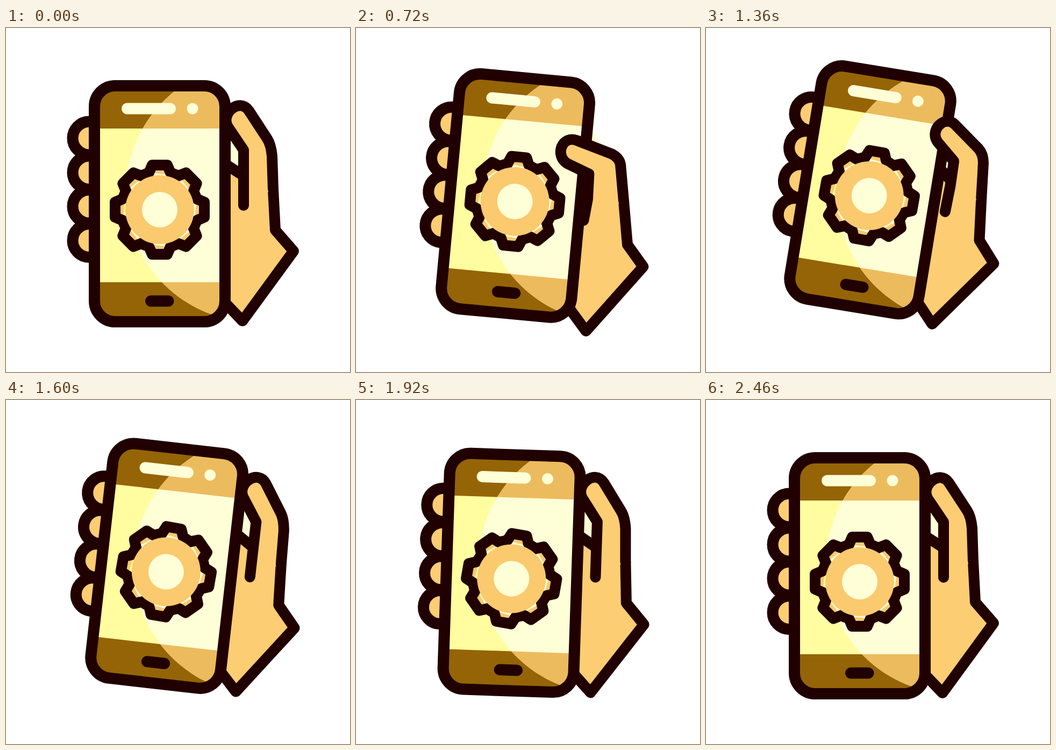
These frames come from a looping animation (640 px wide and 640 px high, 2620 ms). An HTML page without scripts:

```html
<!DOCTYPE html>
<html lang="en">
<head>
<meta charset="utf-8">
<title>Phone in hand</title>
<style>
  html, body { margin: 0; width: 100%; height: 100%; overflow: hidden; background: #fff; }
  svg { display: block; width: 100%; height: 100%; }
  .line { stroke: #200000; stroke-width: 21; stroke-linecap: round; stroke-linejoin: round; }
  .thin { stroke-width: 20; }
  .skin { fill: #fccd73; }
  .pale { fill: #feffd6; }
</style>
</head>
<body>
<svg viewBox="0 0 640 640">
  <defs>
    <clipPath id="body"><rect x="165" y="108" width="242" height="438" rx="38"/></clipPath>
    <clipPath id="glare"><circle cx="464" cy="306" r="241"/></clipPath>
    <path id="tooth" d="M-20 -69L-14 -83H14L20 -69L34.65 -62.9"/>
    <path id="bands" d="M165 108H407V187H165ZM165 473H407V546H165Z"/>
  </defs>

  <g>
    <!-- whole hand and phone tilt around the wrist -->
    <animateTransform attributeName="transform" type="rotate" dur="2.62s" repeatCount="indefinite"
      calcMode="spline" keyTimes="0;.0763;.458;.8397;1"
      values="0 455 434;0 455 434;10 455 434;0 455 434;0 455 434"
      keySplines="0 0 1 1;.333 0 .667 1;.333 0 .667 1;0 0 1 1"/>

    <!-- fingers -->
    <g class="line skin">
      <circle cx="155" cy="205" r="31"/>
      <circle cx="155" cy="269" r="31"/>
      <circle cx="155" cy="332" r="31"/>
      <circle cx="155" cy="395.500" r="31"/>
    </g>

    <!-- palm, with the pale gap under the thumb -->
    <path class="pale" d="M410 182L442 227V275L400 248Z"/>
    <path class="line thin skin" d="M442 275L400 248L395 498L440 545L535 415L501 376L497 300">
      <animate attributeName="d" dur="2.62s" repeatCount="indefinite"
        calcMode="spline" keyTimes="0;.0763;.458;.5725;1"
        values="M442 275L400 248L395 498L440 545L535 415L501 376L497 300;
                M442 275L400 248L395 498L440 545L535 415L501 376L497 300;
                M418 300L395 272L395 516L440 567L535 438L502 400L487 320;
                M442 275L400 248L395 498L440 545L535 415L501 376L497 300;
                M442 275L400 248L395 498L440 545L535 415L501 376L497 300"
        keySplines="0 0 1 1;.25 1 .5 1;.333 0 .667 1;0 0 1 1"/>
    </path>

    <!-- phone -->
    <g clip-path="url(#body)">
      <rect x="165" y="108" width="242" height="438" fill="#fffd9f"/>
      <use href="#bands" fill="#956406"/>
      <g clip-path="url(#glare)">
        <rect class="pale" x="165" y="108" width="242" height="438"/>
        <use href="#bands" fill="#ecbb5e"/>
      </g>
    </g>
    <rect class="line" x="164.500" y="107.500" width="243" height="439" rx="38.500" fill="none"/>
    <rect class="pale" x="215" y="139.500" width="101" height="21" rx="10.500"/>
    <circle class="pale" cx="347" cy="150" r="10.500"/>
    <path class="line" d="M269.500 508H302"/>

    <!-- gear -->
    <g transform="translate(286 338)">
      <g>
        <animateTransform attributeName="transform" type="rotate" dur="2.62s" repeatCount="indefinite"
          calcMode="spline" keyTimes="0;.458;.8397;.9008;1" values="0;0;10;0;0"
          keySplines="0 0 1 1;.333 0 .667 1;.333 0 .667 1;0 0 1 1"/>
        <g fill="#fbc96e">
          <g class="line thin">
            <use href="#tooth"/>
            <use href="#tooth" transform="rotate(45)"/>
            <use href="#tooth" transform="rotate(90)"/>
            <use href="#tooth" transform="rotate(135)"/>
            <use href="#tooth" transform="rotate(180)"/>
            <use href="#tooth" transform="rotate(225)"/>
            <use href="#tooth" transform="rotate(270)"/>
            <use href="#tooth" transform="rotate(315)"/>
          </g>
          <circle r="64"/>
        </g>
        <circle class="pale" r="33"/>
      </g>
    </g>

    <!-- thumb -->
    <path class="line thin skin" d="M497 300L495 238Q493 217 486 206L452 154C434 128 398 160 413 184L442 227L442 275L442 330">
      <animate attributeName="d" dur="2.62s" repeatCount="indefinite"
        calcMode="spline" keyTimes="0;.0763;.458;.5725;1"
        values="M497 300L495 238Q493 217 486 206L452 154C434 128 398 160 413 184L442 227L442 275L442 330;
                M497 300L495 238Q493 217 486 206L452 154C434 128 398 160 413 184L442 227L442 275L442 330;
                M487 320L474 252Q471 241 456 235L387 218C358 211 348 250 374 263L417 277L419 324L415 363;
                M497 300L495 238Q493 217 486 206L452 154C434 128 398 160 413 184L442 227L442 275L442 330;
                M497 300L495 238Q493 217 486 206L452 154C434 128 398 160 413 184L442 227L442 275L442 330"
        keySplines="0 0 1 1;.25 1 .5 1;.333 0 .667 1;0 0 1 1"/>
    </path>
  </g>
</svg>
</body>
</html>
```
